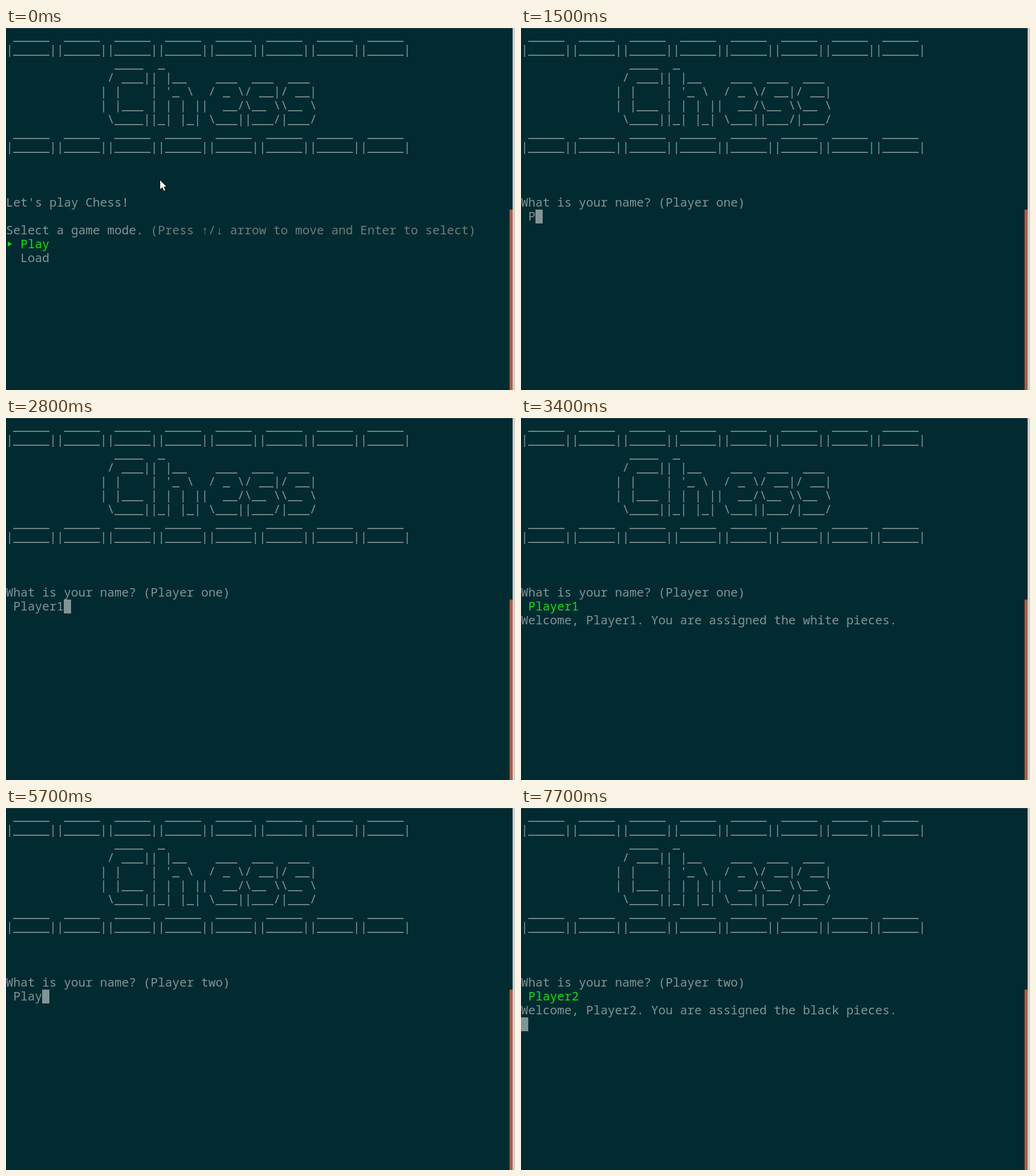
Write an HTML page with a canvas that moves like this. It is 845 px wide and 600 px high and loops after 8 s.

```html
<!DOCTYPE html>
<html lang="en">
<head>
<meta charset="utf-8">
<title>Terminal chess</title>
<style>
html, body { margin: 0; width: 100%; height: 100%; overflow: hidden; background: #012b31; }
canvas { display: block; }
</style>
</head>
<body>
<canvas id="stage" width="845" height="600"></canvas>
<script>
const ctx = document.getElementById('stage').getContext('2d');
const LOOP = 8000, CELL = 12, LINE = 23, TOP = 2, BASELINE = 18;
const BACK = '#012b31', TEXT = '#839496', DIM = '#6f7c78', GREEN = '#14e014';

const bricks = [' _____ '.repeat(8), '|_____|'.repeat(8)];
const title = String.raw`
               ____  _
              / ___|| |__    ___  ___  ___
             | |    | '_ \  / _ \/ __|/ __|
             | |___ | | | ||  __/\__ \\__ \
              \____||_| |_| \___||___/|___/
`.split('\n').slice(1, -1);
const banner = [...bricks, ...title, ...bricks];

const players = [
  { start: 400, number: 'one', name: 'Player1', side: 'white', welcome: 3000,
    keys: [1500, 1700, 1900, 2000, 2200, 2400, 2800] },
  { start: 4500, number: 'two', name: 'Player2', side: 'black', welcome: 6600,
    keys: [5200, 5200, 5500, 5700, 6000, 6000, 6500] },
];
const cursorOff = [[400, 500], [3400, 4000], [4600, 4700], [7100, 7700]];

function rect(color, x, y, w, h) {
  ctx.fillStyle = color;
  ctx.fillRect(x, y, w, h);
}

// Like a terminal, every character sits in its own cell.
function write(text, col, row, color = TEXT) {
  ctx.fillStyle = color;
  [...text].forEach((char, i) => {
    if (char !== ' ') ctx.fillText(char, (col + i) * CELL, TOP + row * LINE + BASELINE);
  });
}

function polygon(points, fill, stroke) {
  const path = new Path2D(`M${points}Z`);
  ctx.fillStyle = fill;
  ctx.fill(path);
  if (stroke) {
    ctx.strokeStyle = stroke;
    ctx.stroke(path);
  }
}

function drawCursor(col, row, t) {
  if (!cursorOff.some(([from, to]) => t >= from && t < to))
    rect(TEXT, col * CELL, TOP + row * LINE, CELL, LINE);
}

function drawMenu() {
  write("Let's play Chess!", 0, 12);
  write('Select a game mode.', 0, 14);
  write('(Press ↑/↓ arrow to move and Enter to select)', 20, 14, DIM);
  polygon('3 354L10 358L3 362', GREEN);
  write('Play', 2, 15, GREEN);
  write('Load', 2, 16);
  polygon('255.5 251.5V268L259.5 264.5L262 270.5L265 269.2L262.3 263.5H267', '#fff', '#111');
}

function drawPrompt(player, t) {
  const typed = player.keys.filter(time => time <= t).length;
  const done = t >= player.welcome;
  write(`What is your name? (Player ${player.number})`, 0, 12);
  write(player.name.slice(0, typed), 1, 13, done ? GREEN : TEXT);
  if (done) {
    write(`Welcome, ${player.name}. You are assigned the ${player.side} pieces.`, 0, 14);
    drawCursor(0, 15, t);
  } else {
    drawCursor(1 + typed, 13, t);
  }
}

function draw(now) {
  const t = now % LOOP;
  rect(BACK, 0, 0, 845, 600);
  rect('#2c4548', 0, 0, 841, 1);
  rect('#b05c42', 836, 301, 5, 299);
  rect('#d0cfcc', 841, 0, 4, 600);

  ctx.font = '20px "Noto Sans Mono", "DejaVu Sans Mono", monospace';
  banner.forEach((line, row) => write(line, 0, row));
  const player = players.findLast(p => t >= p.start);
  if (player) drawPrompt(player, t);
  else drawMenu();
}

const begin = performance.now();
function tick() {
  draw(performance.now() - begin);
  requestAnimationFrame(tick);
}
tick();
</script>
</body>
</html>
```
